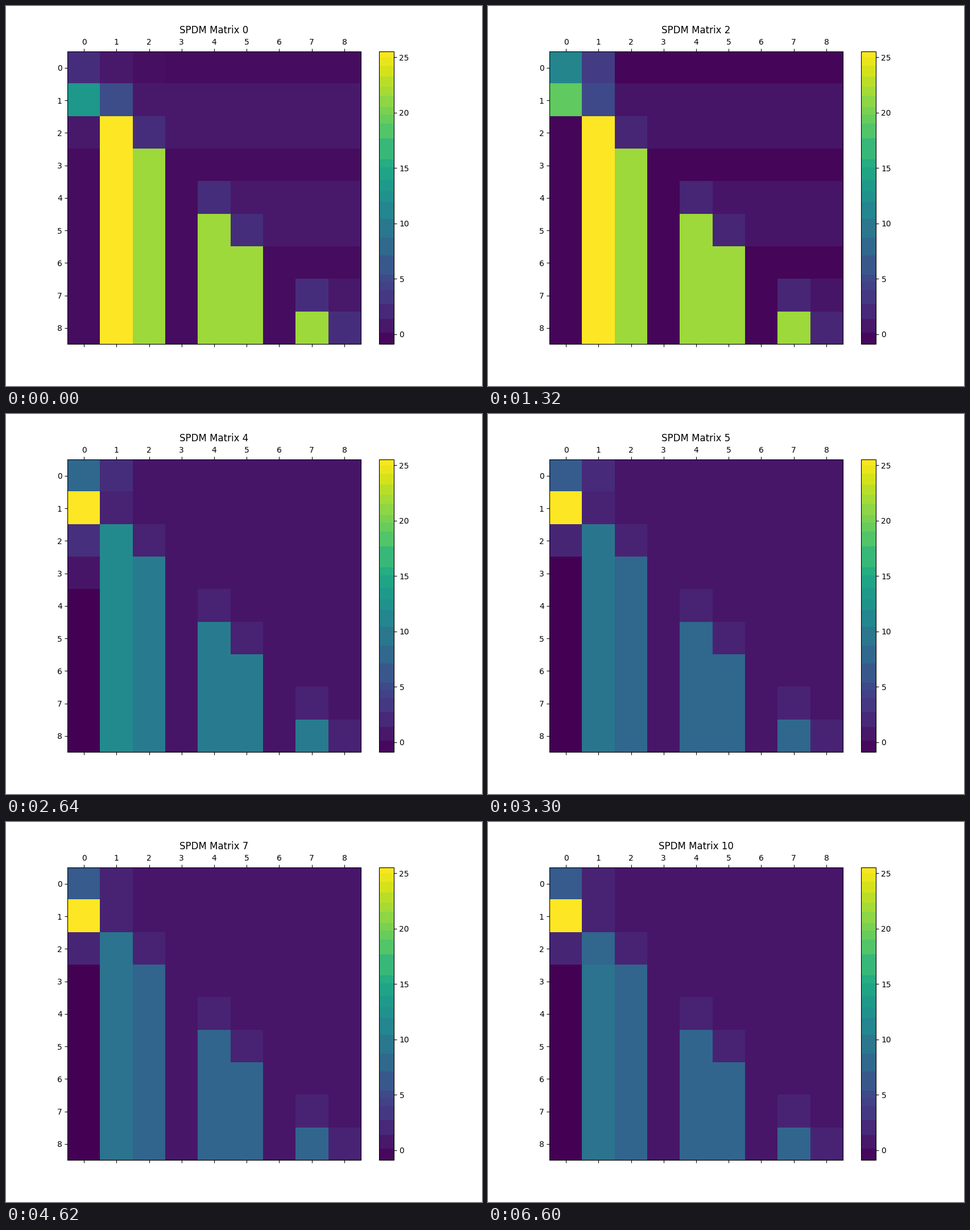
Animation of 837x669 px, one loop 7260 ms. Source, as a matplotlib script:

```python
import numpy as np
import matplotlib.pyplot as plt
from matplotlib.animation import FuncAnimation

N = 9
STEPS = 11
LOW, HIGH = -0.9, 25.52

# Colour-scale positions (0..1) of each group of cells; every step lists
# only what differs from the step before it.
CHANGES = [
    dict(zero=.032, upper=.07, diag=.13, lower=.855, col1=1, c21=1, tail=.032,
         c00=.13, c01=.07, c02=.042, c10=.535, c11=.235, c20=.07, c30=.032),
    dict(zero=.02, upper=.062, diag=.115, tail=.02, c00=.3, c01=.13,
         c02=.02, c10=.62, c11=.225, c20=.02, c30=.02),
    dict(zero=.014, upper=.056, diag=.106, tail=.014, c00=.455, c01=.178,
         c02=.014, c10=.755, c11=.22, c20=.012, c30=.014),
    dict(zero=.028, upper=.06, diag=.1, lower=.645, col1=.755, c21=.755,
         tail=.026, c01=.178, c02=.04, c10=1, c11=.178, c20=.06, c30=.042),
    dict(zero=.056, upper=.056, diag=.096, lower=.415, col1=.48, c21=.48,
         tail=0, c00=.335, c01=.13, c02=.056, c11=.096, c20=.135, c30=.058),
    dict(zero=.062, upper=.062, diag=.1, lower=.335, col1=.39, c21=.39,
         c00=.29, c01=.122, c02=.062, c11=.1, c20=.102, c30=0),
    dict(lower=.33, col1=.385, c21=.385, c01=.104),
    dict(lower=.327, col1=.38, c21=.38, c00=.287, c01=.1),
    dict(),
    dict(c21=.33),
    dict(),
]

# Edges of the colour bar's flat bands
BANDS = [LOW, .15, 1.4, 2.7, 4.0, 4.7, 5.4, 7.1, 8.7, 10.4, 11.95, 12.9,
         13.95, 15.05, 15.8, 17.7, 19.0, 19.85, 20.5, 21.55, 22.35, 23.3,
         24.25, 25.0, HIGH]


def matrix(step):
    p = {}
    for change in CHANGES[:step + 1]:
        p.update(change)
    m = np.full((N, N), p["zero"])
    for k in (1, 2, 4, 5, 7, 8):
        m[k, k + 1:] = p["upper"]
        m[k + 1:, k] = p["lower"]
        m[k, k] = p["diag"]
    m[2:, 1] = p["col1"]
    m[4:, 0] = p["tail"]
    for name, value in p.items():
        if name[1:].isdigit():
            m[int(name[1]), int(name[2])] = value
    return LOW + m * (HIGH - LOW)


# The small margin keeps the width from rounding down to 836 px
fig, ax = plt.subplots(figsize=(8.3701, 6.6901), dpi=100)
image = ax.matshow(matrix(0), cmap="viridis", vmin=LOW, vmax=HIGH)
title = ax.set_title("SPDM Matrix 0")

bar = fig.colorbar(image)
bar.solids.set_visible(False)
edges = np.array(BANDS)
centers = (edges[:-1] + edges[1:]) / 2
bar.ax.pcolormesh([0, 1], edges, centers[:, None], cmap="viridis",
                  vmin=LOW, vmax=HIGH)
bar.ax.set_xlim(0, 1)
bar.ax.set_ylim(LOW, HIGH)


def update(step):
    image.set_data(matrix(step))
    title.set_text(f"SPDM Matrix {step}")
    return image, title


anim = FuncAnimation(fig, update, frames=STEPS, interval=660,
                     repeat=True, repeat_delay=0, blit=False)
plt.show()
```
